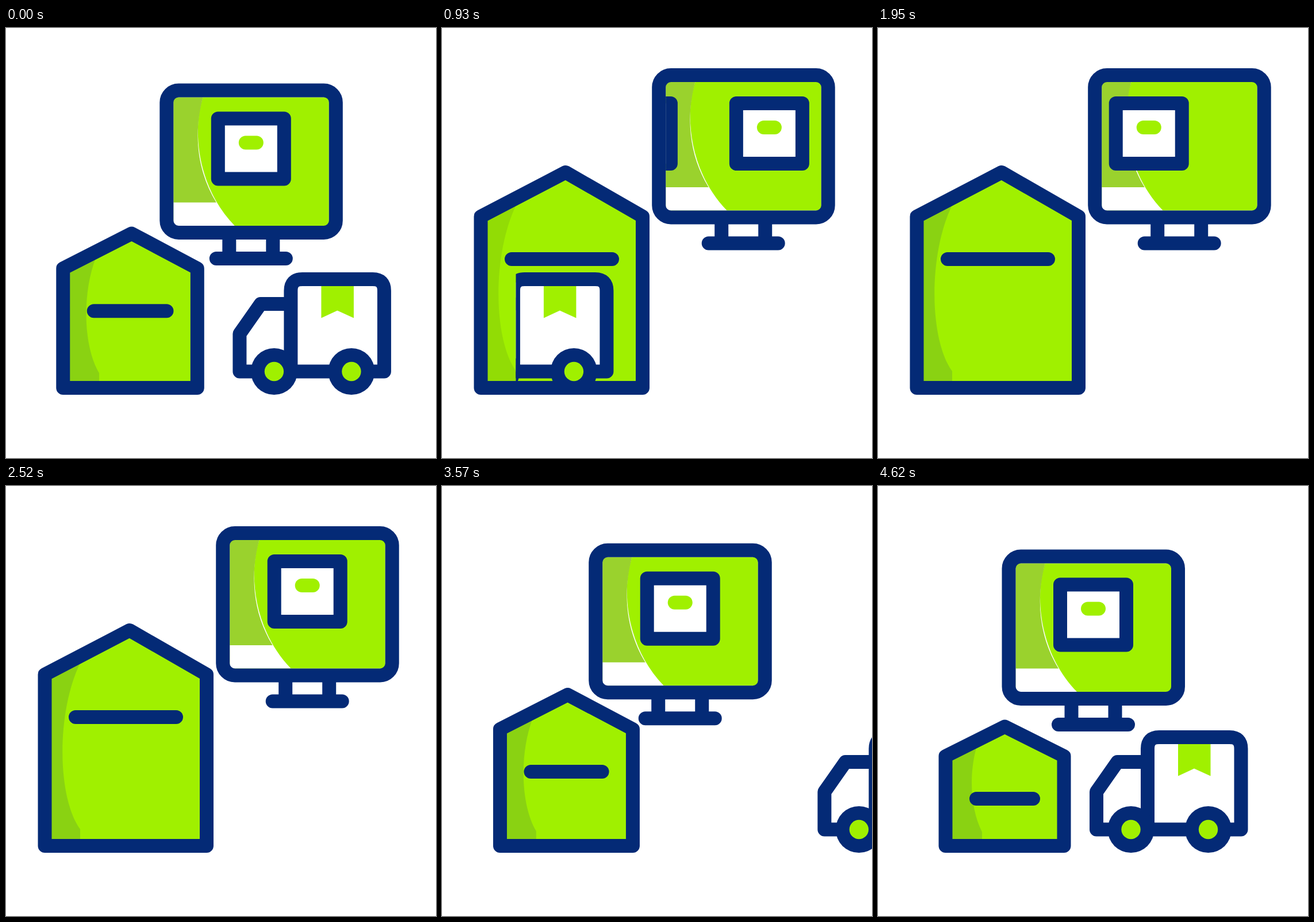
An HTML page for the animation above (4.89 s loop, 748 by 748 pixels).

```html
<!DOCTYPE html>
<html lang="en">
<head>
<meta charset="utf-8">
<title>Order, warehouse, delivery</title>
<style>
  html, body { margin: 0; width: 100%; height: 100%; overflow: hidden; background: #fff; }
  svg { display: block; width: 100%; height: 100%; }
  .line { stroke: #042a76; stroke-width: 24; stroke-linejoin: round; stroke-linecap: round; fill: none; }
  .green { fill: #a0f000; }
  .white { fill: #fff; }
</style>
</head>
<body>
<svg viewBox="0 0 748 748">
  <defs>
    <clipPath id="screen"><rect x="239.5" y="134.5" width="270.5" height="223.5"/></clipPath>
    <clipPath id="doorway"><rect x="128.5" y="380" width="620" height="300"/></clipPath>
    <g id="parcel">
      <rect class="line white" style="fill:#fff" x="317" y="171.5" width="115" height="105"/>
      <path d="M365 213.5H384" stroke="#a0f000" stroke-width="24" stroke-linecap="round"/>
    </g>
    <g id="wheel">
      <circle r="40.5" fill="#042a76"/>
      <circle r="16.7" class="green"/>
    </g>
  </defs>

  <path id="house" class="green"/>
  <path id="houseShade"/>
  <path id="houseLine" class="line"/>

  <g clip-path="url(#doorway)">
    <g id="truck">
      <path class="line" style="fill:#fff" d="M469 480H416.5L380 532V597.5H469"/>
      <path class="line" style="fill:#fff" d="M469 597.5V457Q469 437 489 437H611.5Q631.5 437 631.5 457V597.5Z"/>
      <path class="green" d="M522 449H578.5V504.5L550 491.5L522 504.5Z"/>
      <use href="#wheel" x="440" y="597.5"/>
      <use href="#wheel" x="574.5" y="597.5"/>
    </g>
  </g>

  <g id="monitor">
    <path class="line" d="M336.5 372V415M412.5 372V415M314 415H435"/>
    <g clip-path="url(#screen)">
      <rect class="green" x="228" y="123" width="294" height="247"/>
      <path class="white" d="M291 134C272 190 280 290 346 358H228V134Z"/>
      <path fill="#9ad22d" d="M291 134C274 196 280 262 314 317.5H228V134Z"/>
      <use id="parcelA" href="#parcel"/>
      <use id="parcelB" href="#parcel"/>
    </g>
    <rect class="line" x="227.5" y="122.5" width="294.5" height="247.5" rx="21"/>
  </g>
</svg>
<script>
const LOOP = 4890, STEP = 30;
const el = id => document.getElementById(id);
const clamp = u => Math.min(1, Math.max(0, u));
const mix = (a, b, u) => a + (b - a) * u;

const smooth = u => u * u * (3 - 2 * u);
const cubic = u => u < .5 ? 4 * u ** 3 : 1 - 4 * (1 - u) ** 3;
const tween = (t, start, end, ease = smooth) => ease(clamp((t - start) / (end - start)));
const move = (id, x, y = 0) => el(id).setAttribute("transform", `translate(${x} ${y})`);

function drawHouse(p, lit) {
  const at = (a, b) => mix(a, b, p).toFixed(2);
  const left = at(117.5, 67.5), right = at(323.5, 349);
  const eaves = at(470, 328);
  const walls = `M${left} 626V${eaves}L${at(220.5, 215)} ${at(418.5, 251)}L${right} ${eaves}V626Z`;
  const bar = `M${at(171, 121)} ${at(544, 402)}H${at(270, 296)}`;
  el("house").setAttribute("d", walls);
  el("houseLine").setAttribute("d", walls + bar);
  el("houseShade").setAttribute("d",
    `M${at(172, 129)} ${at(452, 308)}C${at(158, 88)} ${at(500, 392)} ${at(160, 88)} ${at(560, 540)} ` +
    `${at(181, 129)} ${at(602, 597)}V626H${left}V${eaves}Z`);
  el("houseShade").setAttribute("fill", lit ? "#92dc05" : "#8ad212");
}

function truckX(t) {
  if (t < 210) return 33 * tween(t, -522, 210);
  if (t < 2400) return 33 - 577 * tween(t, 210, 1400);
  if (t < 4440) return 163 * ((4440 - t) / 570) ** 1.583 - 33;
  return -33 * (1 - tween(t, 4440, 4620));
}

function draw(t) {
  // The scene rests in its end pose before the loop cuts back.
  drawHouse(tween(t, -335, 485) - tween(t, 3066, 3886), t >= 510 && t < 1770);
  move("truck", truckX(t));

  const away = tween(t, -232, 354) - tween(t, 3182, 3768);
  move("monitor", 149.7 * away, -40.5 * away);

  const back = tween(t, 1740, 2520);
  move("parcelA", 283 * (tween(t, 725, 1325, cubic) - back));
  move("parcelB", -229 + 226 * tween(t, 650, 1410, cubic) - 280 * back);
}

const begin = performance.now();
function tick() {
  const t = (performance.now() - begin) % LOOP;
  draw(Math.floor(t / STEP) * STEP);
  requestAnimationFrame(tick);
}
tick();
</script>
</body>
</html>
```
